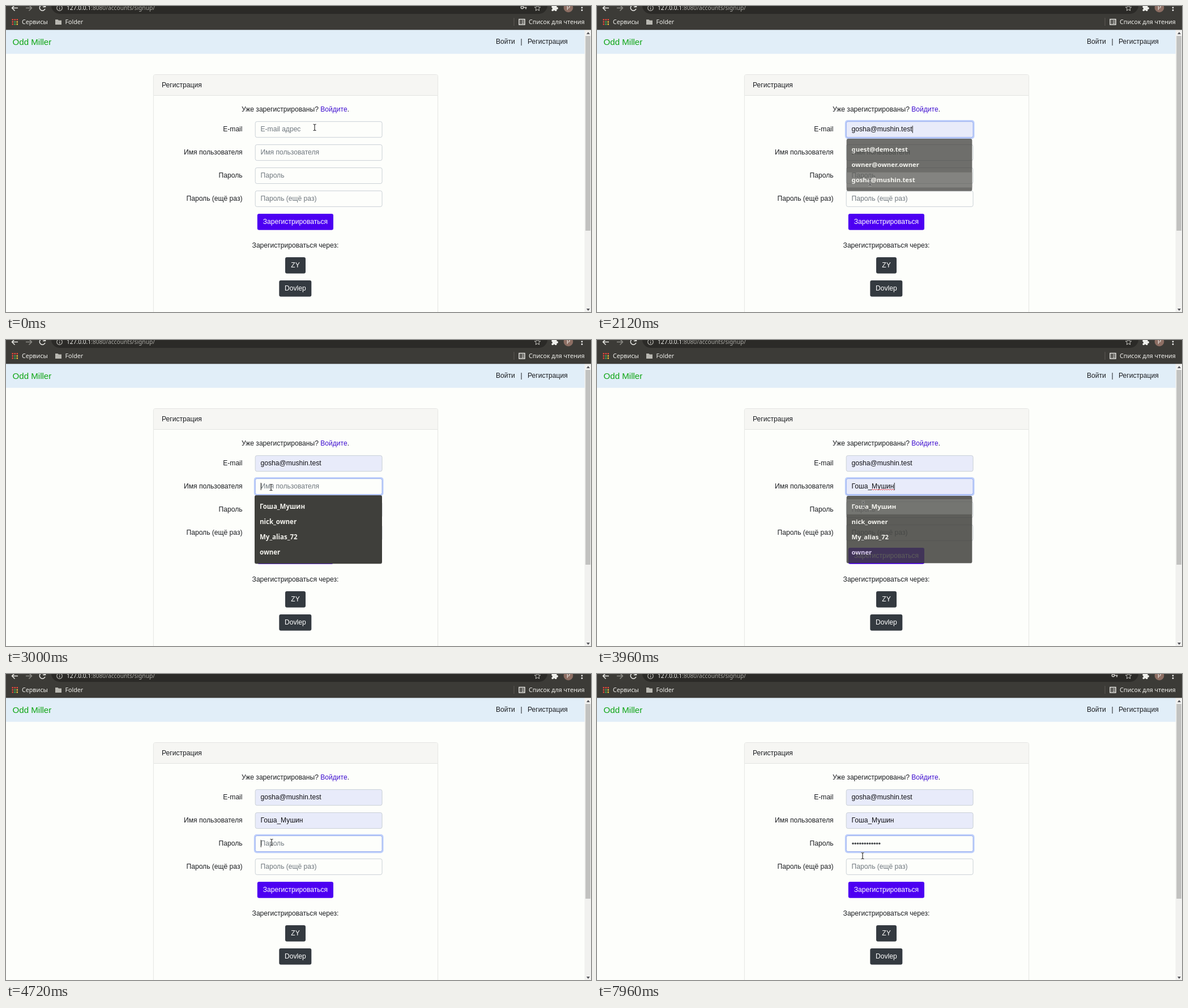
Recreate the animation shown at these times as an HTML page. Size 1033 by 542 pixels, loop 8 s.

```html
<!DOCTYPE html>
<html lang="ru">
<head>
<meta charset="utf-8">
<title>Регистрация</title>
<style>
  html, body { margin: 0; width: 100%; height: 100%; overflow: hidden; background: #fdfefb; }
  svg { display: block; width: 100vw; height: 100vh; }
  text { font: 12.1px "Liberation Sans", Arial, sans-serif; fill: #1b1d21; white-space: pre; }
  .ui { font: 10.7px "Noto Sans", "Open Sans", sans-serif; fill: #f0f0ec; }
  .url { font-size: 10.2px; }
  .item { font: 600 11.5px "Noto Sans", "Open Sans", sans-serif; fill: #f2f1ec; }
  .brand { font-size: 15.1px; fill: #0da512; }
  .hint { fill: #6f777e; }
  .value { fill: #101014; }
  .preview { font-size: 10.1px; fill: #101014; }
  .light { fill: #fff; }
  .end { text-anchor: end; }
  .mid { text-anchor: middle; }
  .line { fill: none; stroke: #e8e8e4; stroke-width: 1.5; }
  .dim { fill: none; stroke: #8b8a85; stroke-width: 1.5; }
</style>
</head>
<body>
<svg viewBox="0 0 1033 542" preserveAspectRatio="none">
  <g id="page"></g>
  <g id="live"></g>
</svg>
<script>
const LOOP = 8000, TICK = 40;
const MAILS = ['guest@demo.test', 'owner@owner.owner', 'gosha@mushin.test'];
const NICKS = ['Гоша_Мушин', 'nick_owner', 'My_alias_72', 'owner'];
const LABELS = ['E-mail', 'Имя пользователя', 'Пароль', 'Пароль (ещё раз)'];
const HINTS = ['E-mail адрес', ...LABELS.slice(1)];

// Form geometry
const FIELD_Y = 204.3, FIELD_H = 28.8, PITCH = 40.9;
const MENU_PAD = 6.2, ROW_H = 27.2, MAIL_TOP = 234.3, NICK_TOP = 275, DOT = 4.25;

// Story, in ms
const OPEN = 480, MAIL_PICK = 2040, NICK_FOCUS = 2840, NICK_PICK = 3920, PASS_FOCUS = 4480;
const BURSTS = [5360, 6240, 6840, 7160], BURST = 3;
const EDITS = [OPEN, MAIL_PICK, NICK_FOCUS, NICK_PICK, PASS_FOCUS + 80, ...BURSTS.map(b => b + 2 * TICK)];
const HOME = { x: 545, y: 215 };
const MOVES = [
  { from: 80, to: 320, x: 521, y: 221 },
  { from: 880, to: 1600, x: 482, y: 312 },
  { from: 2280, to: 2640, x: 468, y: 261 },
  { from: 3160, to: 3640, x: 470, y: 292 },
  { from: 4240, to: 4400, x: 469, y: 298 },
  { from: 7760, to: 7960, x: 469, y: 322 }
];

const ramp = (t, from, to) => Math.min(1, Math.max(0, (t - from) / (to - from)));
const easeOut = p => 1 - (1 - p) ** 2;

const rect = (x, y, w, h, fill, more = '') =>
  `<rect x="${x}" y="${y}" width="${w}" height="${h}" fill="${fill}" ${more}/>`;
const text = (x, y, s, cls = '') => `<text x="${x}" y="${y}" class="${cls}">${s}</text>`;
const path = (d, more = 'class="line"') => `<path d="${d}" ${more}/>`;
const circle = (x, y, r, fill) => `<circle cx="${x}" cy="${y}" r="${r}" fill="${fill}"/>`;
const button = (x, y, w, label, fill) =>
  rect(x, y, w, FIELD_H, fill, 'rx="3"') + text(x + w / 2, y + 18.1, label, 'mid light');

const pen = document.createElement('canvas').getContext('2d');
pen.font = '12.1px "Liberation Sans", Arial, sans-serif';
const widthOf = s => pen.measureText(s).width;

function toolbar() {
  let s = rect(0, 0, 1033, 42.3, '#3c3b37') + rect(80, -16, 876, 30, '#2b2a27', 'rx="15"');
  s += path('M21 3.5H11M15.5-1.5L10.5 3.5L15.5 8.5');
  s += path('M35 3.5H45M40.5-1.5L45.5 3.5L40.5 8.5', 'class="dim"');
  s += path('M68.5 0.5A5 5 0 1 0 69 5M69.5-3V1.5H65');
  s += '<circle cx="94.5" cy="3.5" r="4.8" fill="none" stroke="#b5b4af" stroke-width="1.2"/>';
  s += rect(94, 2.8, 1.2, 3.6, '#b5b4af') + rect(94, .6, 1.2, 1.2, '#b5b4af');
  s += text(107, 7, '127.0.0.1<tspan fill="#aaa9a4">:8080/accounts/signup/</tspan>', 'ui url');

  let star = '';
  for (let i = 0; i < 10; i++) {
    const r = i % 2 ? 2.5 : 5.4, a = i * Math.PI / 5;
    star += `${i ? 'L' : 'M'}${938.5 + r * Math.sin(a)} ${3.8 - r * Math.cos(a)}`;
  }
  s += path(star + 'Z', 'fill="none" stroke="#c9c8c3"');
  s += rect(963.5, -1, 9, 10, '#efefeb', 'rx="1"') + circle(973, 4, 2, '#efefeb')
    + circle(963.5, 4.5, 1.5, '#3c3b37') + circle(968, 9, 1.5, '#3c3b37');
  s += circle(993, 3, 8.3, '#8d6e63') + text(993, 7, 'P', 'ui mid');
  s += circle(1017, 3, 1.4, '#eee') + circle(1017, 7.5, 1.4, '#eee');

  const colors = ['#e4473a', '#3fa857', '#eebd3d'];
  for (let i = 0; i < 9; i++)
    s += rect(10.5 + i % 3 * 4, 23 + (i / 3 | 0) * 4, 2.5, 2.5, colors[i < 3 ? 0 : i % 3]);
  s += text(28, 32, 'Сервисы', 'ui') + text(104.5, 32, 'Folder', 'ui');
  s += path('M87 24H91.5L93 25.5H98V33H87Z', 'fill="#b9b8b2"');
  s += rect(896.5, 21, 1, 14, '#5c5b56') + rect(906, 23.5, 10, 9.5, 'none', 'class="line"');
  for (let y = 26; y < 31; y += 2.3)
    s += path(`M908 ${y}h1m1.5 0h4`, 'stroke="#e8e8e4" stroke-width="1.1"');
  return s + text(923, 32, 'Список для чтения', 'ui');
}

function page() {
  let s = rect(0, 0, 1033, 542, '#fdfefb') + rect(0, 42, 1022, 42.7, '#e1eef8');
  s += rect(1021.6, 42, 11.4, 500, '#f1f1ef') + rect(1023.3, 53, 8.6, 345, '#c1c1bf');
  s += path('M1025 50L1028 46L1031 50ZM1025 536L1028 540L1031 536Z', 'fill="#55555a"');
  s += toolbar();
  s += text(11.5, 69, 'Odd Miller', 'brand') + text(865, 67, 'Войти') + text(908.5, 67, '|')
    + text(921, 67, 'Регистрация');
  s += rect(260.4, 121.5, 502.2, 440, '#fdfefb', 'rx="3" stroke="#dedfdc" stroke-width=".8"');
  s += path('M261 158V124Q261 122 263 122H760Q762 122 762 124V158Z', 'fill="#f6f6f3"');
  s += rect(261, 158, 501, .8, '#dedfdc') + text(275, 144, 'Регистрация');
  s += text(511, 187, 'Уже зарегистрированы? <tspan fill="#3f0fd0">Войдите</tspan>.', 'mid');
  LABELS.forEach((label, i) => s += text(417.5, FIELD_Y + 18.1 + PITCH * i, label, 'end'));
  s += button(443.8, FIELD_Y + PITCH * 4, 134.2, 'Зарегистрироваться', '#4d00f2');
  s += text(511, 428, 'Зарегистрироваться через:', 'mid');
  return s + button(493, 445, 36, 'ZY', '#343a40') + button(482.3, 445 + PITCH, 57, 'Dovlep', '#343a40');
}

function field(i, ring, value, cls, filled) {
  const y = FIELD_Y + PITCH * i;
  let s = '';
  if (ring) s += rect(437.8, y - 2.3, 228.8, FIELD_H + 4.6, '#bfd0fb', `rx="5" opacity="${ring}"`);
  s += rect(440.2, y + .4, 223.9, FIELD_H - .8, filled ? '#e8ebfa' : '#fdfefb',
    `rx="3" stroke="${ring > .4 ? '#8da5ee' : '#c6ccd3'}" stroke-width=".9"`);
  return s + text(449.5, y + 18.1, value || HINTS[i], value ? cls : 'hint');
}

function menu(items, top, alpha, hover) {
  if (!alpha) return '';
  const height = items.length * ROW_H + 2 * MENU_PAD - .2;
  const scale = alpha < 1 ? .985 : 1, cy = top + height / 2;
  let s = rect(439, top + 1, 225, height, '#000', 'rx="3" opacity=".25"')
    + rect(439, top, 225, height, '#3f3f3b', 'rx="3"');
  items.forEach((item, i) => {
    const y = top + MENU_PAD + ROW_H * i;
    if (i === hover) s += rect(439, y, 225, ROW_H, '#5b5b57');
    s += text(448, y + 17.6, item, 'item');
  });
  return `<g opacity="${alpha}" transform="translate(551.5 ${cy}) scale(${scale}) translate(-551.5 ${-cy})">${s}</g>`;
}

function pointerAt(t) {
  return MOVES.reduce((pos, m) => {
    const p = easeOut(ramp(t, m.from, m.to));
    return { x: pos.x + (m.x - pos.x) * p, y: pos.y + (m.y - pos.y) * p };
  }, HOME);
}

function pointer({ x, y }, arrow) {
  const beam = 'M-2.5-5.5Q0-5.5 0-4Q0-5.5 2.5-5.5M0-4.5V4.5M-2.5 5.5Q0 5.5 0 4Q0 5.5 2.5 5.5';
  const shape = arrow
    ? path('M0 0V11.5L2.7 9.2L4.6 13.6L6.5 12.7L4.6 8.5H8.2Z', 'fill="#161616" stroke="#eee" stroke-width=".8"')
    : path(beam, 'fill="none" stroke="#fff" stroke-width="2.4" opacity=".7"')
      + path(beam, 'fill="none" stroke="#222" stroke-width="1.1"');
  return `<g transform="translate(${Math.round(x)} ${Math.round(y)})">${shape}</g>`;
}

function squiggle(from, to) {
  let d = `M${from} 265`;
  for (let x = from; x < to - 2; x += 4) d += 'q1-2 2 0t2 0';
  return path(d, 'fill="none" stroke="#e0343a" stroke-width=".9"');
}

function live(t) {
  const mouse = pointerAt(t);
  const mailDone = t >= MAIL_PICK, nickDone = t >= NICK_PICK;
  const overMail = t >= OPEN && !mailDone && mouse.y > MAIL_TOP;
  const overNick = t >= NICK_FOCUS && !nickDone && mouse.y > NICK_TOP;
  const rowAt = top => Math.floor((mouse.y - top - MENU_PAD) / ROW_H);
  const mailRow = mailDone ? 2 : overMail ? rowAt(MAIL_TOP) : -1;
  const nickRow = nickDone ? 0 : overNick ? rowAt(NICK_TOP) : -1;
  const mail = MAILS[mailRow], nick = NICKS[nickRow];

  const mailAlpha = ramp(t, OPEN - 40, 600) * (1 - ramp(t, MAIL_PICK - 40, 2240) ** 2);
  const nickAlpha = ramp(t, NICK_FOCUS - 120, NICK_FOCUS) * (1 - ramp(t, NICK_PICK - 40, 4080) ** 2);
  const toNick = ramp(t, NICK_FOCUS, NICK_FOCUS + 160);
  const toPass = ramp(t, PASS_FOCUS - 80, PASS_FOCUS + 80);

  const dots = BURSTS.reduce((n, b) => n + Math.round(BURST * ramp(t, b - TICK, b + (BURST - 1) * TICK)), 0);

  let s = field(0, ramp(t, OPEN - 40, 600) - toNick, mail, mailDone ? 'value' : 'preview', mail)
    + field(1, toNick - toPass, nick, nickDone ? 'value' : 'preview', nick)
    + field(2, toPass, dots ? ' ' : '', 'value')
    + field(3, 0);
  for (let i = 0; i < dots; i++) s += circle(452 + DOT * i, 300.2, 1.75, '#45484c');

  if (nickDone && t < PASS_FOCUS)
    s += squiggle(449.5 + widthOf('Гоша_'), 449.5 + widthOf(nick));

  const focus = t < NICK_FOCUS ? 0 : t < PASS_FOCUS ? 1 : 2;
  const edit = EDITS.filter(e => e <= t).pop();
  if ((t - edit) % 1120 < 560 && !overMail && !overNick) {
    const typed = [mailDone ? widthOf(mail) : 0, nickDone ? widthOf(nick) : 0, dots * DOT];
    s += rect(449.7 + typed[focus], 212 + PITCH * focus, 1, 13, '#222');
  }
  if (!mailDone || dots)
    s += '<circle cx="911.5" cy="2.5" r="2.2" fill="none" stroke="#c9c8c3" stroke-width="1.6"/>'
      + path('M914 2.5H919.5M918 2.5V5.5', 'stroke="#c9c8c3" stroke-width="1.7"');

  return s + menu(MAILS, MAIL_TOP, mailAlpha, mailRow)
    + menu(NICKS, NICK_TOP, nickAlpha, nickRow) + pointer(mouse, overMail || overNick);
}

document.getElementById('page').innerHTML = page();
const layer = document.getElementById('live');
const start = performance.now();
let shown = '';
function tick() {
  const t = (performance.now() - start) % LOOP;
  const next = live(Math.floor(t / TICK) * TICK);
  if (next !== shown) layer.innerHTML = shown = next;
  requestAnimationFrame(tick);
}
tick();
</script>
</body>
</html>
```
